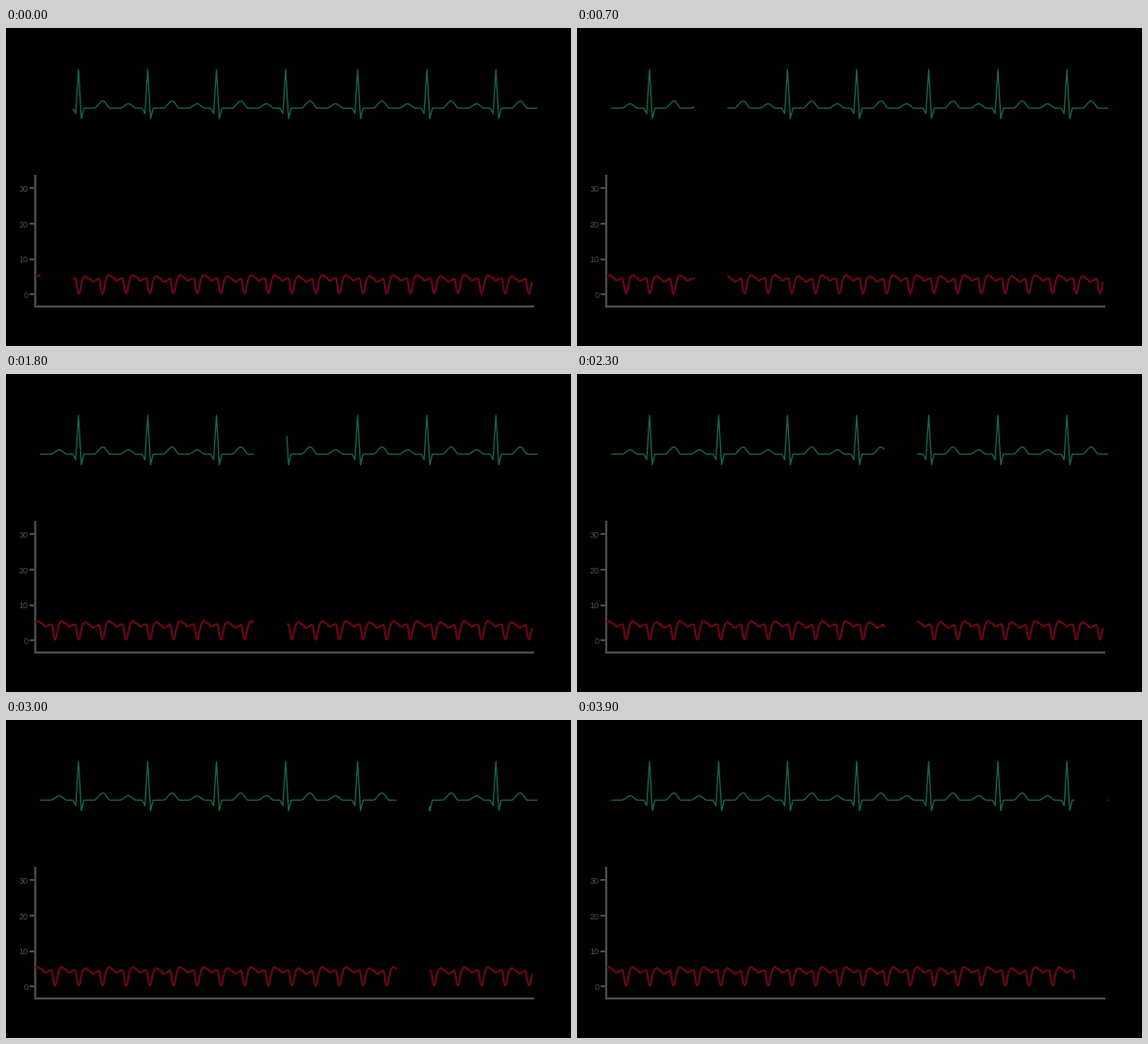
These frames come from a looping animation (600x338 px, 4000 ms). A matplotlib script:

```python
import numpy as np
import matplotlib.pyplot as plt
from matplotlib.animation import FuncAnimation

W, H, DPI = 600, 338, 100
FRAMES, STEP_MS = 40, 100
PX = 72 / DPI  # one pixel in points

GREEN, RED, GLOW, AXIS, LABEL = "#176846", "#78091a", "#2a0308", "#4a4a4a", "#505050"
SWEEP_START, SWEEP_STEP, GAP = 36.3, 12.615, 34.8


def bump(x, left, top, right, height):
    """Rounded wave rising from left to top and falling to right."""
    half = np.where(x < top, top - left, right - top)
    u = np.clip(np.abs(x - top) / half, 0, 1)
    return height * (0.5 + 0.5 * np.cos(np.pi * u)) ** 0.9


def heart_trace(x):
    y = np.full_like(x, 85.2)
    for peak in (77, 150.5, 223.5, 297, 373.5, 447, 520.25):
        p_top = peak - (23.5 if peak == 373.5 else 20.5)
        y -= bump(x, p_top - 9, p_top, p_top + 8, 4.6)
        y -= bump(x, peak + 16.5, peak + 26, peak + 33.5, 7.6)
        y += np.interp(x, peak + np.array([-6, -3, 0, 3, 5.75]),
                       [0, 5.8, -41.2, 11.2, 0])
    return y


def pressure_trace(x):
    """Repeating pulse; offsets are measured from each trough."""
    dx = np.array([-3.8, -2.8, -1.5, 0, 1.3, 2.6, 4, 5.5, 7.3, 9, 10.5,
                   12.2, 14, 16, 18, 20, 21.4])
    dy = np.array([266, 267.5, 278, 282.4, 280.5, 273, 267, 263.6, 262.4, 263.6,
                   265, 265.4, 268.2, 268.4, 267, 266.2, 266])
    troughs = 52 + 25.16 * np.arange(-1, 21)
    xs, ys = [], []
    for i, t in enumerate(troughs):
        shift = np.where(dx > 5, 1.2 * (i % 3 == 2), 0)
        xs.extend(t + dx)
        ys.extend(dy + shift)
    order = np.argsort(xs)
    return np.interp(x, np.array(xs)[order], np.array(ys)[order])


fig = plt.figure(figsize=(W / DPI, H / DPI), dpi=DPI, facecolor="black")
ax = fig.add_axes([0, 0, 1, 1])
ax.set_xlim(0, W)
ax.set_ylim(H, 0)
ax.axis("off")

ax.plot([31.2, 31.2, 560.5], [155.5, 295.5, 295.5], color=AXIS, lw=2.4 * PX,
        solid_capstyle="butt", solid_joinstyle="miter")
for value in (0, 10, 20, 30):
    y = 283.2 - 3.77 * value
    ax.plot([25, 31], [y, y], color=AXIS, lw=2 * PX, solid_capstyle="butt")
    ax.text(23.5, y + 0.3, str(value), color=LABEL, fontsize=9 * PX,
            family="Liberation Sans", ha="right", va="center_baseline")

heart_x = np.arange(36.25, 564.5, 0.25)
pressure_x = np.arange(32, 558.75, 0.25)
heart_y, pressure_y = heart_trace(heart_x), pressure_trace(pressure_x)


def trace_line(color, width):
    return ax.plot([], [], color=color, lw=width * PX, solid_capstyle="butt",
                   solid_joinstyle="round")[0]


glow = trace_line(GLOW, 3)
pressure = trace_line(RED, 1.3)
heart = trace_line(GREEN, 1.3)
traces = [(glow, pressure_x, pressure_y), (pressure, pressure_x, pressure_y),
          (heart, heart_x, heart_y)]


def draw(frame):
    left = SWEEP_START + SWEEP_STEP * frame
    for line, x, y in traces:
        hidden = (x > left) & (x < left + GAP)
        line.set_data(x, np.where(hidden, np.nan, y))
    return [line for line, _, _ in traces]


anim = FuncAnimation(fig, draw, frames=FRAMES, interval=STEP_MS,
                     repeat=True, repeat_delay=0, blit=False)
plt.show()
```
